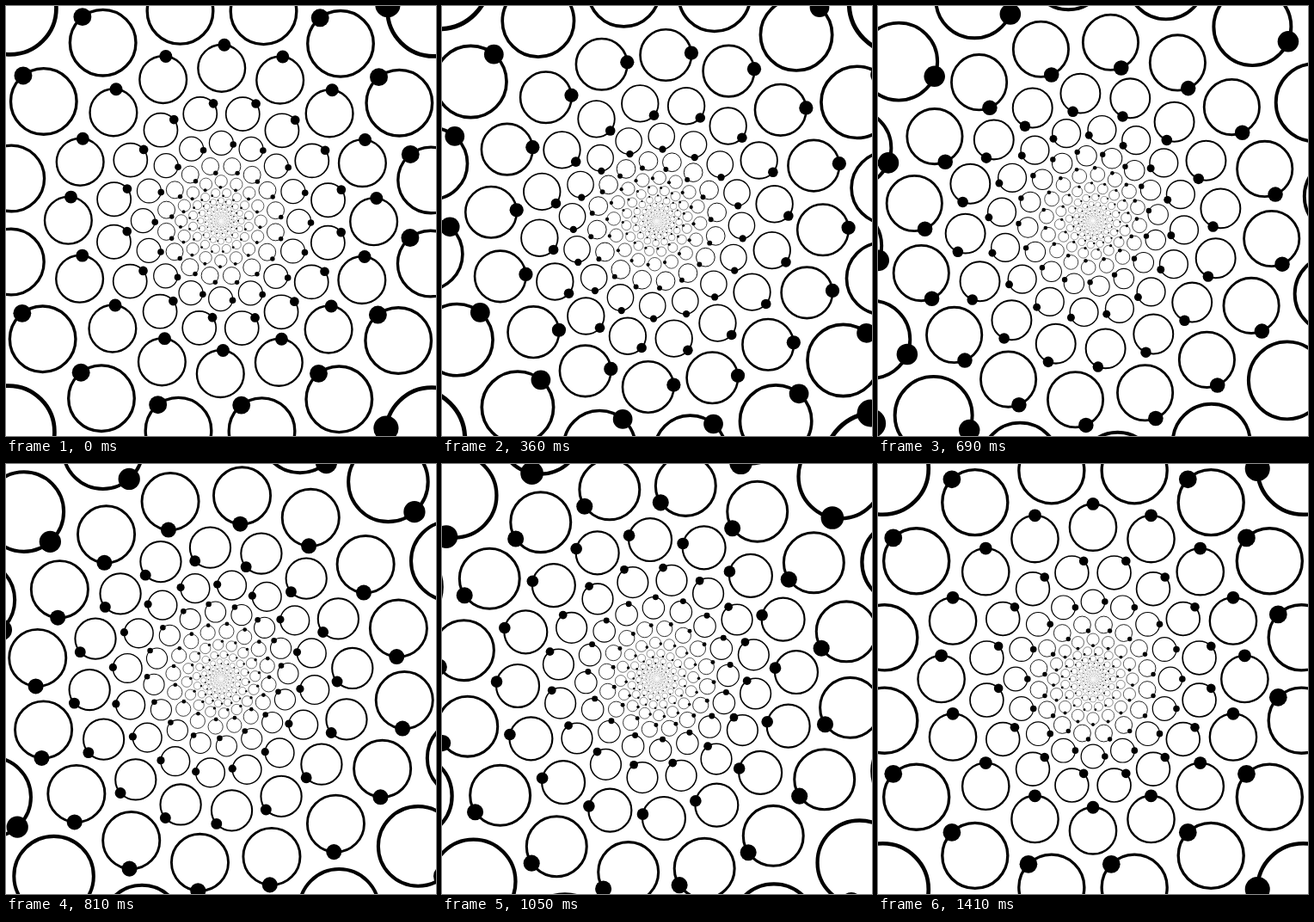
Write an HTML page with a canvas that moves like this. It is 500 by 500 pixels and loops after 1440 ms.

```html
<!DOCTYPE html>
<html lang="en">
<head>
<meta charset="utf-8">
<title>Orbiting spiral</title>
<style>
  html, body { margin: 0; width: 100%; height: 100%; overflow: hidden; background: #fff; }
  canvas { display: block; }
</style>
</head>
<body>
<canvas id="stage" width="500" height="500"></canvas>
<script>
const ctx = document.getElementById('stage').getContext('2d');
const TAU = Math.PI * 2;
const STEPS = 48, STEP_MS = 30;
const PER_RING = 16, GROWTH = 1.4, BASE = 176.4;

// Point at a distance and clockwise angle from straight up
const polar = (x, y, r, a) => [x + r * Math.sin(a), y - r * Math.cos(a)];

function circlePath(x, y, r) {
  ctx.beginPath();
  ctx.arc(x, y, r, 0, TAU);
}

function draw(phase) {
  ctx.fillStyle = '#fff';
  ctx.fillRect(0, 0, 500, 500);
  ctx.fillStyle = ctx.strokeStyle = '#000';

  for (let ring = -18; ring <= 2; ring++) {
    const u = ring + phase;
    const distance = BASE * GROWTH ** u;
    const radius = distance * 0.154;
    const dotAngle = TAU * (phase - u / 8);
    ctx.lineWidth = distance * 0.0135;

    for (let i = 0; i < PER_RING; i++) {
      const [x, y] = polar(250, 250, distance, TAU * (i + u / 2) / PER_RING);
      circlePath(x, y, radius);
      ctx.stroke();
      circlePath(...polar(x, y, radius, dotAngle), distance * 0.042);
      ctx.fill();
    }
  }
}

function tick() {
  // Each loop carries every ring to the place of the next one out
  const step = Math.floor(performance.now() / STEP_MS) % STEPS;
  draw((step + 1) / STEPS);
  requestAnimationFrame(tick);
}
tick();
</script>
</body>
</html>
```
